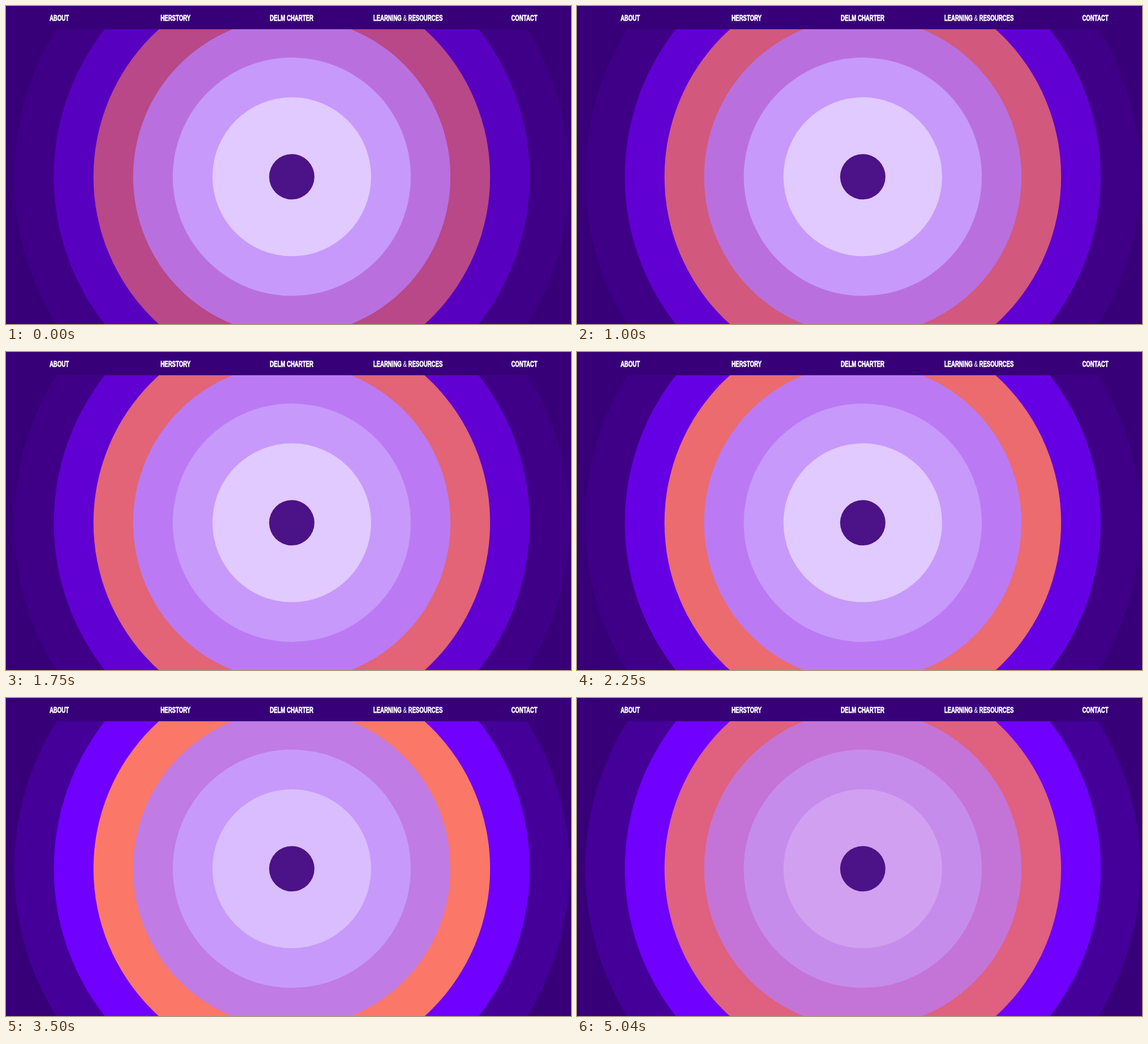
An HTML page that plays this animation: 998 by 561 pixels, repeating every 5330 ms.

```html
<!DOCTYPE html>
<html lang="en">
<head>
<meta charset="utf-8">
<title>Pulsing rings</title>
<style>
  html, body { margin: 0; width: 100%; height: 100%; overflow: hidden; background: #370078; }
  svg { display: block; width: 100%; height: 100%; }
  text {
    font: bold 15.5px "Liberation Sans", Arial, sans-serif;
    text-anchor: middle;
    fill: #fff;
    stroke: #fff;
    stroke-width: .8px;
  }
  .amp { font-weight: normal; stroke-width: .2px; }
</style>
</head>
<body>
<svg viewBox="0 0 998 561">
  <rect width="998" height="561" fill="#370078"/>
  <g id="rings"></g>
  <circle cx="504.8" cy="301.2" r="40" fill="#4c1287"/>
  <rect width="998" height="41" fill="#370078"/>
  <g id="nav">
    <text transform="translate(94 26.2) scale(.62 1)">ABOUT</text>
    <text transform="translate(299.5 26.2) scale(.62 1)">HERSTORY</text>
    <text transform="translate(504.5 26.2) scale(.62 1)">DELM CHARTER</text>
    <text transform="translate(710 26.2) scale(.62 1)">LEARNING <tspan class="amp">&amp;</tspan> RESOURCES</text>
    <text transform="translate(915.5 26.2) scale(.62 1)">CONTACT</text>
  </g>
</svg>
<script>
  const LOOP = 5330;
  const TICK = 250;
  const STEP = 70.06;

  // Outermost ring first; each maps a time in ms to a fill.
  const rings = [
    { 0: '#3f0087', 2250: '#3f0087', 2500: '#440098', 5040: '#440099' },
    { 0: '#5800c0', 1000: '#6000d2', 1750: '#6000d2', 2500: '#6900ed', 3500: '#7000ff', 5040: '#7000ff' },
    { 0: '#b84888', 1000: '#d2587e', 1250: '#d2587e', 1750: '#e26476', 2500: '#ef6e6c', 3500: '#fb7768', 4000: '#f57069', 4750: '#e5657c', 5040: '#e06080' },
    { 0: '#b970de', 1000: '#b970de', 1250: '#bb7af4', 3000: '#bb7af4', 3500: '#c07be4', 5040: '#c474d6' },
    { 0: '#c799fb', 3750: '#c799fb', 4750: '#c68eee', 5040: '#c68cec' },
    { 0: '#e1caff', 2250: '#e1caff', 2500: '#dabeff', 3750: '#dabdff', 4750: '#d3a4f2', 5040: '#d2a0f0' }
  ];

  // Colours move in held steps, one per tick.
  function keyframes(stops) {
    const times = Object.keys(stops).map(Number);
    const frames = times.map((t, i) => {
      const next = times[i + 1] ?? LOOP;
      const n = Math.max(1, Math.round((next - t) / TICK));
      return { offset: t / LOOP, fill: stops[t], easing: `steps(${n}, end)` };
    });
    frames.push({ offset: 1, fill: stops[times.at(-1)] });
    return frames;
  }

  const group = document.getElementById('rings');
  rings.forEach((stops, i) => {
    const ring = document.createElementNS('http://www.w3.org/2000/svg', 'circle');
    ring.setAttribute('cx', 504.8);
    ring.setAttribute('cy', 301.2);
    ring.setAttribute('r', STEP * (rings.length + 1 - i));
    ring.setAttribute('fill', stops[0]);
    group.append(ring);
    ring.animate(keyframes(stops), { duration: LOOP, iterations: Infinity });
  });
</script>
</body>
</html>
```
